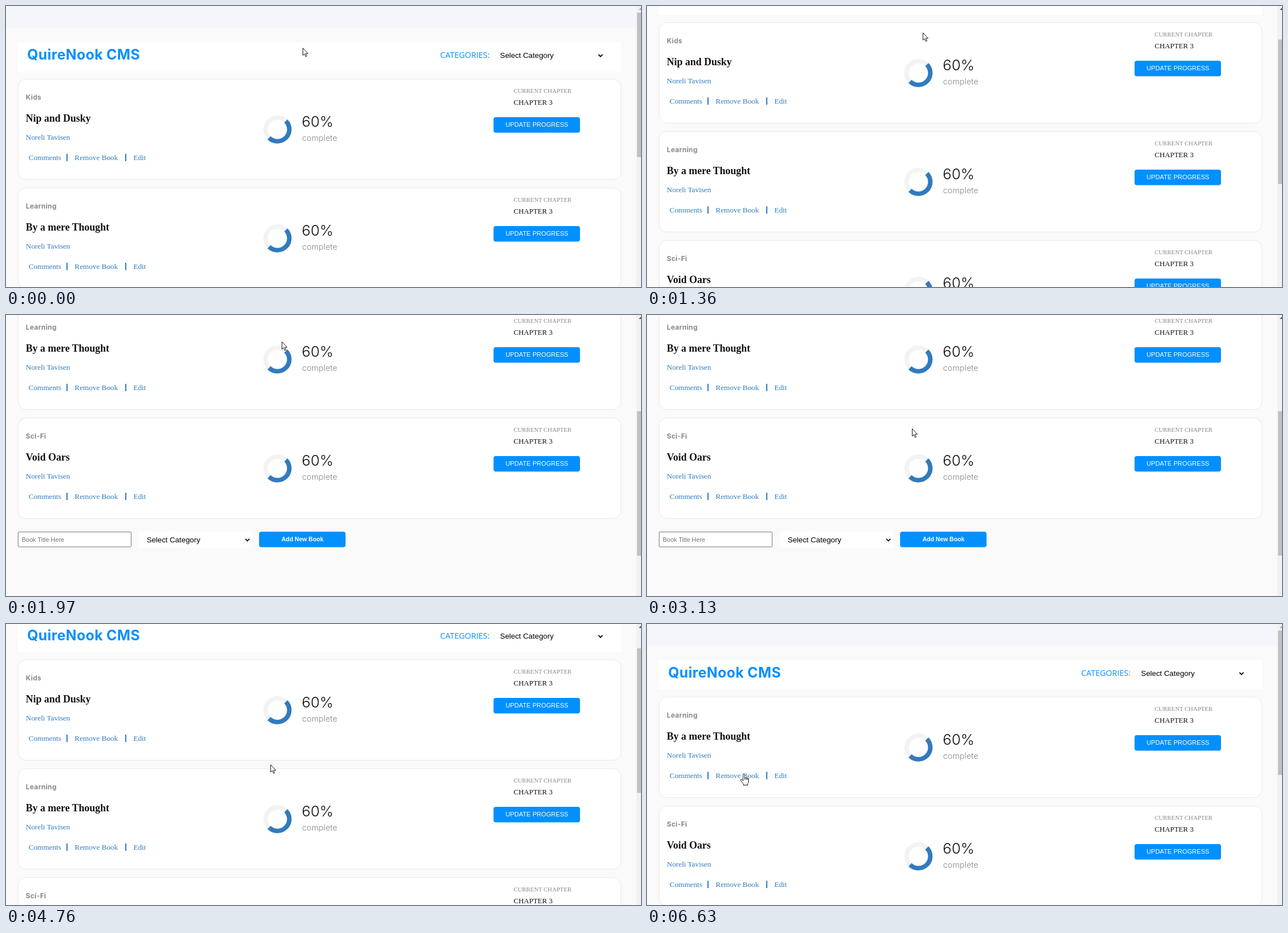
Write an HTML page that moves like this. It is 1124 px wide and 498 px high and loops after 8000 ms.

```html
<!DOCTYPE html>
<html lang="en">
<head>
<meta charset="utf-8">
<title>Book list</title>
<style>
html, body { margin: 0; width: 100%; height: 100%; overflow: hidden; background: #fafafa; }
svg { display: block; width: 1124px; height: 498px; }
text { white-space: pre; }
.brand { font: 700 25px Inter, sans-serif; letter-spacing: .4px; fill: #0290ff; }
.label { font: 500 14.4px "Open Sans", sans-serif; fill: #0290ff; }
.select { font: 13.33px "Liberation Sans", sans-serif; fill: #000; }
.genre { font: 700 12px Inter, sans-serif; letter-spacing: .35px; fill: #888; }
.title { font: 700 18px "Liberation Serif", serif; fill: #121212; }
.link { font: 13.33px "Liberation Serif", serif; fill: #307bbe; }
.percent { font: 300 26px Inter, sans-serif; fill: #121212; }
.done { font: 300 14.5px Inter, sans-serif; fill: #888; }
.small { font: 10.85px "Liberation Serif", serif; fill: #888; }
.chapter { font: 13px "Liberation Serif", serif; fill: #121212; }
.button { font: 11.2px "Liberation Sans", sans-serif; fill: #fff; text-anchor: middle; }
.add { font: 700 10.5px "Liberation Sans", sans-serif; }
.hint { font: 11px "Liberation Sans", sans-serif; fill: #757575; }
.chevron { fill: none; stroke: #111; stroke-width: 1.9; }
.pointer path { fill: #fff; stroke: #16161e; stroke-width: 1; stroke-linejoin: round; }
</style>
</head>
<body>
<svg viewBox="0 0 1124 498">
  <g id="page"></g>
  <rect x="1115.5" width="9" height="498" fill="#f1f1f1"/>
  <path id="up" d="M1120 7l4.5-4.5 4.5 4.5z"/>
  <rect id="thumb" x="1117" width="15" height="256" fill="#c1c1c1"/>
  <g id="pointer" class="pointer">
    <path id="arrow" d="M.5 .5V13.6L3.4 10.9 5.5 15.8 7.5 14.9 5.4 10.2H9.5z"/>
    <g id="hand">
      <path d="M-1.5 11V1.5a1.5 1.5 0 0 1 3 0V7q1.3-1.2 2.7.2q1.3-1 2.4.4q1.6-.6 1.6 1.4V13q0 2.5-1.4 4.2V19.5H-1V17.5L-5.6 11.2q-.6-1.9 1-2q1.2 0 3.1 2.6z"/>
      <path d="M1.5 7v3M4.2 7.2v3M6.6 7.6v3"/>
    </g>
  </g>
</svg>
<script>
const LOOP = 8000, PITCH = 193, REMOVED = 6630;
const $ = id => document.getElementById(id);

const text = (cls, x, y, str) => `<text class="${cls}" x="${x}" y="${y}">${str}</text>`;
const rect = (x, y, w, h, fill, more = '') =>
  `<rect x="${x}" y="${y}" width="${w}" height="${h}" fill="${fill}" ${more}/>`;
const chevron = (x, y) => `<path class="chevron" d="M${x - 3.6} ${y}l3.6 3.6 3.6-3.6"/>`;
const button = (x, y, str, cls = '') =>
  rect(x, y, 153, 27.5, '#0290ff', 'rx="4"') + text('button ' + cls, x + 76.8, y + 17.4, str);

const card = ([genre, title]) => `<g class="card">
  ${rect(21.5, 129.5, 1067, 178, '#fff', 'rx="14" stroke="#e8e8e8"')}
  ${text('genre', 35, 166, genre)}
  ${text('title', 35, 204.5, title)}
  ${text('link', 35, 237, 'Noreli Tavisen')}
  ${text('link', 40, 273, 'Comments')}
  ${text('link', 121.5, 273, 'Remove Book')}
  ${text('link', 225.5, 273, 'Edit')}
  ${rect(107, 262, 2, 13, '#307bbe')}${rect(211, 262, 2, 13, '#307bbe')}
  <circle cx="480.5" cy="218.7" r="21" fill="none" stroke="#f3f3f3" stroke-width="8"/>
  <path d="M495.35 203.85A21 21 0 0 1 465.65 233.55" fill="none" stroke="#307bbe" stroke-width="8"/>
  ${text('percent', 523.5, 214, '60%')}
  ${text('done', 524, 238.5, 'complete')}
  ${text('small', 898.5, 154, 'CURRENT CHAPTER')}
  ${text('chapter', 898.5, 175, 'CHAPTER 3')}
  ${button(863, 197, 'UPDATE PROGRESS')}
</g>`;

const books = [['Kids', 'Nip and Dusky'], ['Learning', 'By a mere Thought'], ['Sci-Fi', 'Void Oars']];

$('page').innerHTML = `
  ${rect(0, 0, 1116, 38, '#f5f6fb')}
  ${rect(21, 64, 1068, 52, '#fff')}
  ${text('brand', 37.5, 94.5, 'QuireNook CMS')}
  ${text('label', 768.5, 92.3, 'CATEGORIES:')}
  ${text('select', 874.5, 92.3, 'Select Category')}
  ${chevron(1052.3, 86)}
  ${books.map(card).join('')}
  <g id="form">
    ${rect(21.5, 717.5, 200, 26.5, '#fff', 'rx="1.5" stroke="#767676"')}
    ${text('hint', 28, 735, 'Book Title Here')}
    ${rect(235, 717, 200, 29, '#fff')}
    ${text('select', 249, 736.3, 'Select Category')}
    ${chevron(427.3, 729.7)}
    ${button(448, 717, 'Add New Book', 'add')}
  </g>
  <rect id="focus" x="115.5" y="256.5" width="88" height="20" rx="2" fill="none" stroke="#101010"/>`;

// Evenly spaced steps: [time, value]
const run = (start, gap, ...values) => values.map((v, i) => [start + i * gap, v]);
const at = (steps, t) => steps.findLast(s => s[0] <= t)[1];

const scroll = [
  [0, 0],
  ...run(1120, 80, 5, 68, 93, 100),
  ...run(1590, 75, 105, 168, 243, 300, 326, 333),
  ...run(3910, 80, 328, 265, 240, 233),
  ...run(4380, 75.9, 228, 190, 152, 120, 92, 66, 30, 6, 0)
];

const mouse = [
  [0, [525, 74]],
  ...run(540, 100, [503, 57], [488, 47]),
  ...run(2430, 77.7, [482, 62], [446, 122], [376, 200], [312, 258], [288, 284], [318, 294],
    [380, 288], [438, 262], [468, 228], [469, 201], [424, 176]),
  ...run(3300, 76.6, [360, 180], [302, 212], [292, 252], [330, 277], [388, 262], [418, 224], [404, 194]),
  ...run(4611, 74.5, [428, 212], [456, 236], [468, 249], [458, 256], [436, 260], [405, 260], [372, 258], [341, 256]),
  ...run(5220, 78, [322, 254], [300, 251], [278, 249], [258, 248], [240, 255], [222, 260],
    [208, 263], [194, 265], [183, 266], [175, 266], [171.5, 266])
];

const cards = [...document.querySelectorAll('.card')];
const show = (el, on) => el.setAttribute('visibility', on ? 'visible' : 'hidden');
const move = (el, x, y) => el.setAttribute('transform', `translate(${x} ${y})`);

function draw(t) {
  const y = at(scroll, t), [mx, my] = at(mouse, t), gone = t >= REMOVED ? 1 : 0;
  move($('page'), 0, -y);
  $('thumb').setAttribute('y', 11.7 + y * .477);
  $('up').setAttribute('fill', y ? '#505050' : '#a3a3a3');

  show(cards[0], !gone);
  cards.forEach((c, i) => move(c, 0, (i - gone) * PITCH));
  move($('form'), 0, -gone * PITCH);
  show($('focus'), t >= 6460 && !gone);

  const overLink = t > 5220 && my >= 255 && (mx < 204 || mx > 219 && mx < 255);
  move($('pointer'), mx, my);
  show($('arrow'), !overLink);
  show($('hand'), overLink);
}

function tick() {
  draw(performance.now() % LOOP);
  requestAnimationFrame(tick);
}
tick();
</script>
</body>
</html>
```
